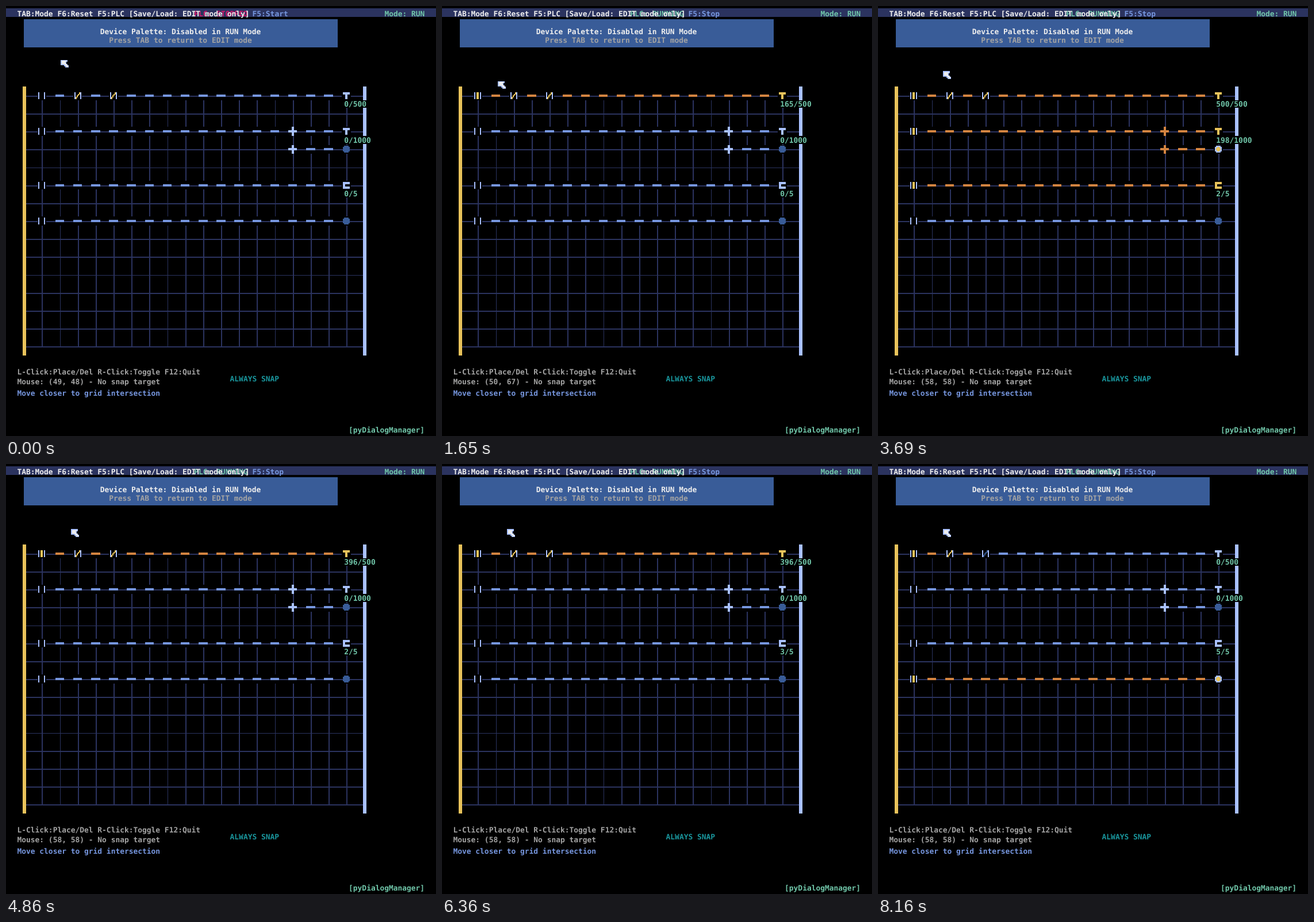
An HTML page with a canvas that plays this animation: 748x748 px, repeating every 9000 ms.

```html
<!DOCTYPE html>
<html lang="en">
<head>
<meta charset="utf-8">
<title>Ladder logic simulator</title>
<style>
html, body { margin: 0; width: 100%; height: 100%; overflow: hidden; background: #000; }
canvas { display: block; width: 748px; height: 748px; }
</style>
</head>
<body>
<canvas id="stage" width="748" height="748"></canvas>
<script>
const ctx = document.getElementById('stage').getContext('2d');
const LOOP = 9000, STEP = 30, RUN_AT = 1500;
const S = 748 / 384;           // the scene is laid out on a 384-unit screen
const CELL = 16;
const C = {
  black: '#000000', navy: '#2b335f', teal: '#19959c', blue: '#395c98',
  pale: '#a9c1ff', white: '#eeeeee', red: '#d4186c', orange: '#d38441',
  yellow: '#e9c35b', green: '#70c6a9', sky: '#7696de', gray: '#a3a3a3'
};

function box(x, y, w, h, color) {
  const l = Math.round(x * S), t = Math.round(y * S);
  ctx.fillStyle = color;
  ctx.fillRect(l, t, Math.round((x + w) * S) - l, Math.round((y + h) * S) - t);
}

// Monospaced text, four units per character
function text(str, x, y, color) {
  ctx.save();
  ctx.scale(S, S);
  ctx.font = 'bold 6.645px "DejaVu Sans Mono", monospace';
  ctx.fillStyle = color;
  ctx.fillText(str, x, y + 5);
  ctx.restore();
}

function tile(x, y) { box(x - 4, y - 4, 8, 8, C.black); }

function wire(x, y, on) {
  tile(x, y);
  box(x - 4, y - 1, 8, 2, on ? C.orange : C.sky);
}

function bars(x, y) {
  tile(x, y);
  box(x - 3, y - 3, 1, 6, C.pale);
  box(x + 2, y - 3, 1, 6, C.pale);
}

function contact(x, y, on) {
  bars(x, y);
  if (on) box(x - 1, y - 3, 2, 6, C.yellow);
}

function closedContact(x, y, on) {
  bars(x, y);
  const color = on ? C.yellow : C.blue;
  for (let i = 0; i < 4; i++) box(x - 2 + i, y + 1 - i * 4 / 3, 1, 2, color);
}

function branch(x, y, on) {
  const color = on ? C.orange : C.pale;
  tile(x, y);
  box(x - 4, y - 1, 8, 2, color);
  box(x - 1, y - 4, 2, 8, color);
}

function disc(x, y, r, color) {
  for (let row = -r; row < r; row++) {
    const half = Math.round(Math.sqrt(r * r - (row + 0.5) ** 2));
    box(x - half, y + row, half * 2, 1, color);
  }
}

function coil(x, y, on) {
  tile(x, y);
  if (on) {
    disc(x, y, 3, C.pale);
    disc(x, y, 2, C.yellow);
  } else {
    box(x - 4, y, 8, 1, C.navy);
    disc(x, y, 3, C.blue);
  }
}

function timer(x, y, on) {
  const color = on ? C.yellow : C.pale;
  tile(x, y);
  box(x - 3, y - 3, 6, 2, color);
  box(x - 1, y - 3, 2, 6, color);
}

function counter(x, y, on) {
  const color = on ? C.yellow : C.pale;
  tile(x, y);
  box(x - 3, y - 3, 2, 6, color);
  box(x - 3, y - 3, 6, 2, color);
  box(x - 3, y + 1, 6, 2, color);
}

function label(str, y) {
  box(301, y + 4, str.length * 4 + 1, 7, C.black);
  text(str, 302, y + 5, C.green);
}

function wires(from, to, y, on) {
  for (let x = from; x <= to; x += CELL) wire(x, y, on);
}

// Ladder state after n scans; both timers repeat every 50 scans
function ladder(n) {
  n = Math.min(n, 222);
  const phase = ((n % 50) + 50) % 50;
  const started = n >= 0;
  const first = phase !== 49, second = n < 221;
  const t1On = started && first && second;
  const t2On = started && phase >= 17 && n < 222;
  return {
    started, first, second, t1On, t2On,
    t1: t1On ? Math.min(500, 33 * phase) : 0,
    t2: t2On ? Math.min(1000, 33 * (phase - 17)) : 0,
    count: started ? Math.min(5, Math.floor((n + 33) / 50)) : 0,
    full: n >= 218
  };
}

function pointer(time) {
  const mix = (a, b, v) => Math.round(a + (b - a) * v);
  if (time < 30) return [49, 48];
  if (time < RUN_AT) {
    const q = Math.min(1, Math.max(0, (time - 300) / 570));
    const v = q * q * (3 - 2 * q);
    return [mix(48, 36, v), mix(48, 82, v)];
  }
  const q = Math.min(1, (time - RUN_AT) / STEP / 12.8);
  const v = 1 - (1 - q) ** 2;
  return [mix(36, 58, v), mix(82, 58, v)];
}

function cursor(x, y) {
  for (let i = 0; i < 5; i++) box(x, y + i, i < 2 ? 6 : 7 - i, 1, C.pale);
  for (let i = 2; i < 6; i++) box(x + i - 1, y + i, 3, 2, C.pale);
  for (let i = 1; i < 4; i++) box(x + 1, y + i, 5 - i, 1, C.white);
  for (let i = 2; i < 6; i++) box(x + i, y + i, 1.5, 1.5, C.white);
}

function drawHeader(running) {
  box(0, 2, 384, 8, C.navy);
  text(running ? 'PLC: RUNNING' : 'PLC: STOPPED', 168, 4, running ? C.green : C.red);
  text('TAB:Mode F6:Reset F5:PLC [Save/Load: EDIT mode only]', 10, 4, C.white);
  text(running ? 'F5:Stop' : 'F5:Start', 220, 4, C.sky);
  text('Mode: RUN', 338, 4, C.green);
  box(16, 12, 280, 25, C.blue);
  text('Device Palette: Disabled in RUN Mode', 84, 20, C.white);
  text('Press TAB to return to EDIT mode', 92, 28, C.gray);
}

function drawGrid() {
  for (let p = 80; p <= 304; p += CELL) box(16, p, 304, 1, C.navy);
  for (let p = 32; p <= 304; p += CELL) box(p, 80, 1, 225, C.navy);
  box(15, 72, 3, 240, C.yellow);
  box(319, 72, 3, 240, C.pale);
}

function drawLadder(s) {
  contact(32, 80, s.started);
  wire(48, 80, s.started);
  closedContact(64, 80, s.first);
  wire(80, 80, s.started && s.first);
  closedContact(96, 80, s.second);
  wires(112, 288, 80, s.t1On);
  timer(304, 80, s.t1On);
  label(s.t1 + '/500', 80);

  contact(32, 112, s.t2On);
  wires(48, 240, 112, s.t2On);
  for (const y of [112, 128]) {
    branch(256, y, s.t2On);
    wires(272, 288, y, s.t2On);
  }
  timer(304, 112, s.t2On);
  label(s.t2 + '/1000', 112);
  coil(304, 128, s.t2On);

  contact(32, 160, s.t2On);
  wires(48, 288, 160, s.t2On);
  counter(304, 160, s.t2On);
  label(s.count + '/5', 160);

  contact(32, 192, s.full);
  wires(48, 288, 192, s.full);
  coil(304, 192, s.full);
}

function drawFooter(x, y) {
  const near = Math.hypot(x - 32, y - 80) < 8;
  text('L-Click:Place/Del R-Click:Toggle F12:Quit', 10, 324, C.gray);
  text(`Mouse: (${x}, ${y}) - ${near ? 'Snap: (32, 80)' : 'No snap target'}`, 10, 333, C.gray);
  if (!near) text('Move closer to grid intersection', 10, 343, C.sky);
  text('ALWAYS SNAP', 200, 330, C.teal);
  text('[pyDialogManager]', 306, 376, C.green);
}

const begin = performance.now();

function frame() {
  const elapsed = (performance.now() - begin) % LOOP;
  const time = Math.floor(elapsed / STEP) * STEP;
  const [x, y] = pointer(time);
  ctx.fillStyle = C.black;
  ctx.fillRect(0, 0, 748, 748);
  drawHeader(time >= 270);
  drawGrid();
  drawLadder(ladder((time - RUN_AT) / STEP));
  drawFooter(x, y);
  cursor(x, y);
  requestAnimationFrame(frame);
}
frame();
</script>
</body>
</html>
```
